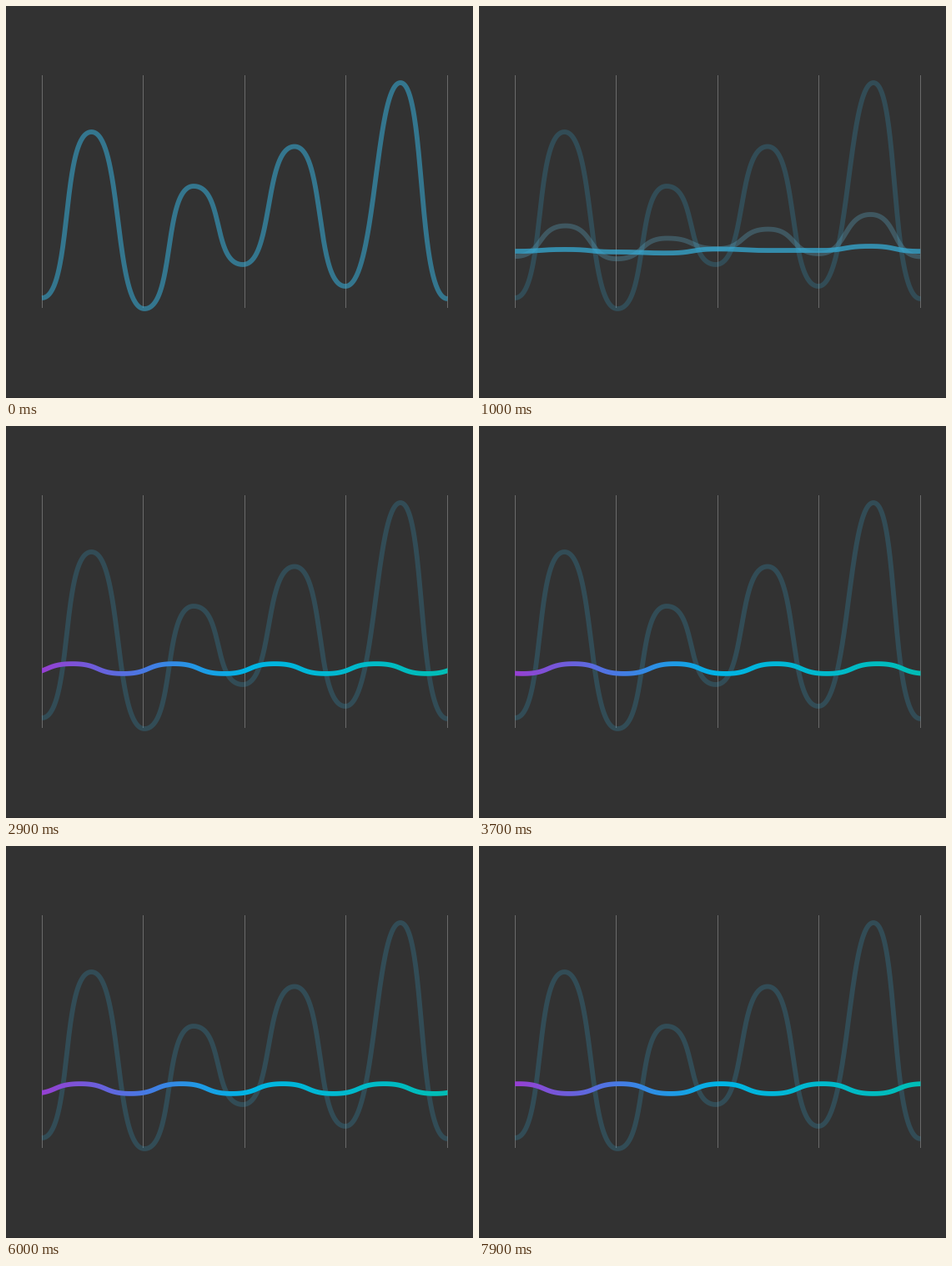
These frames come from a looping animation (560 px wide and 470 px high, 8000 ms). A matplotlib script:

```python
import numpy as np
import matplotlib.pyplot as plt
from matplotlib.animation import FuncAnimation
from matplotlib.colors import LinearSegmentedColormap

W, H, DPI = 560, 470, 100
FRAMES, STEP = 80, 100
LEFT, RIGHT = 43, 529.5
PERIOD, SPEED = 121.5, 42.2
CREST, TROUGH, STROKE = 285.1, 296.9, 5.8
BLUE, PALE = "#36acd7", "#5fafcd"
GRADIENT = LinearSegmentedColormap.from_list(
    "glow", [(0, "#9640d2"), (.25, "#487ae4"), (.5, "#00b4e6"), (1, "#00beb6")])

# Extremes of the tall curve
TALL_X = np.array([43, 102.5, 166, 225, 284, 346, 407, 473, 529.5])
TALL_Y = np.array([350, 151, 363, 216, 310, 168.5, 336, 92, 351])
TALL_H = np.minimum(37, TALL_Y / 3)     # handles, tighter near the top


def ramp(t, start, end):
    return float(np.clip((t - start) / (end - start), 0, 1))


def ease(p):
    return 2 * p * p if p < .5 else 1 - 2 * (1 - p) ** 2


def bezier(a, b, c, d):
    t = np.linspace(0, 1, 80)
    s = 1 - t
    return a * s**3 + 3 * b * s * s * t + 3 * c * s * t * t + d * t**3


def curve(kx, ky, kh):
    """Smooth curve through extremes with horizontal handles."""
    xs, ys = [], []
    for i in range(len(kx) - 1):
        xs.append(bezier(kx[i], kx[i] + kh[i], kx[i + 1] - kh[i + 1], kx[i + 1]))
        ys.append(bezier(ky[i], ky[i], ky[i + 1], ky[i + 1]))
    return np.concatenate(xs), np.concatenate(ys)


def wave_knots(first, count, shift=0):
    n = first + np.arange(count)
    y = np.where(n % 2, TROUGH, CREST)
    return LEFT + .25 + n * PERIOD / 2 + shift, y, np.full(count, 33.0)


def morph(t):
    """Tall curve settling into the low wave."""
    p = ease(ramp(t, .1, 1.2))
    dip = 5.4 * np.sin(np.pi * ramp(t, .82, 1.3))
    x, y, h = wave_knots(0, len(TALL_X))
    return curve(TALL_X + (x - TALL_X) * p,
                 TALL_Y + (y + dip - TALL_Y) * p,
                 TALL_H + (h - TALL_H) * p)


def ribbon(shift, alpha):
    """Gradient stroke as an antialiased RGBA strip."""
    y = np.interp(cols, *curve(*wave_knots(-2, 13, shift % PERIOD)))
    dist = np.abs(rows[:, None] - y) / np.hypot(1, np.gradient(y))
    strip = np.tile(GRADIENT((cols - LEFT) / (RIGHT - LEFT)), (len(rows), 1, 1))
    strip[..., 3] = np.clip(STROKE / 2 + .5 - dist, 0, 1) * alpha
    strip[:, -1, 3] *= .5
    return strip


fig = plt.figure(figsize=(W / DPI, H / DPI), dpi=DPI, facecolor="#323232")
ax = fig.add_axes([0, 0, 1, 1])
ax.axis("off")

for i in range(5):
    x = int(LEFT + i * PERIOD)
    ax.add_patch(plt.Rectangle((x, 83), 1, 279, fc="#6a6a6a", lw=0))
ax.add_patch(plt.Rectangle((0, 469), W, 1, fc="#2d2c2c", lw=0))


def stroke(color):
    return ax.plot(*curve(TALL_X, TALL_Y, TALL_H), color=color,
                   lw=STROKE * 72 / DPI, solid_capstyle="butt",
                   solid_joinstyle="round")[0]


tall, echo, main = stroke(BLUE), stroke(PALE), stroke(BLUE)

cols = np.arange(43, 530) + .5
rows = np.arange(275, 310) + .5
band = ax.imshow(ribbon(0, 0), extent=(43, 530, 310, 275), aspect="auto",
                 interpolation="nearest", zorder=5)
ax.set_xlim(0, W)
ax.set_ylim(H, 0)


def draw(i):
    t = i * STEP / 1000
    rise, swap = ramp(t, .1, 1), ramp(t, 1, 2)
    tall.set_alpha(.56 - .34 * rise)
    echo.set_data(*morph(t - .173))
    echo.set_alpha(.3 * rise * (1 - ramp(t, 1, 1.9)))
    main.set_data(*morph(t))
    main.set_alpha(.74 * rise * (1 - swap))
    band.set_data(ribbon(SPEED * max(0, t - 2.04), swap))
    return tall, echo, main, band


anim = FuncAnimation(fig, draw, frames=FRAMES, interval=STEP,
                     repeat=True, repeat_delay=0, blit=False)
plt.show()
```
